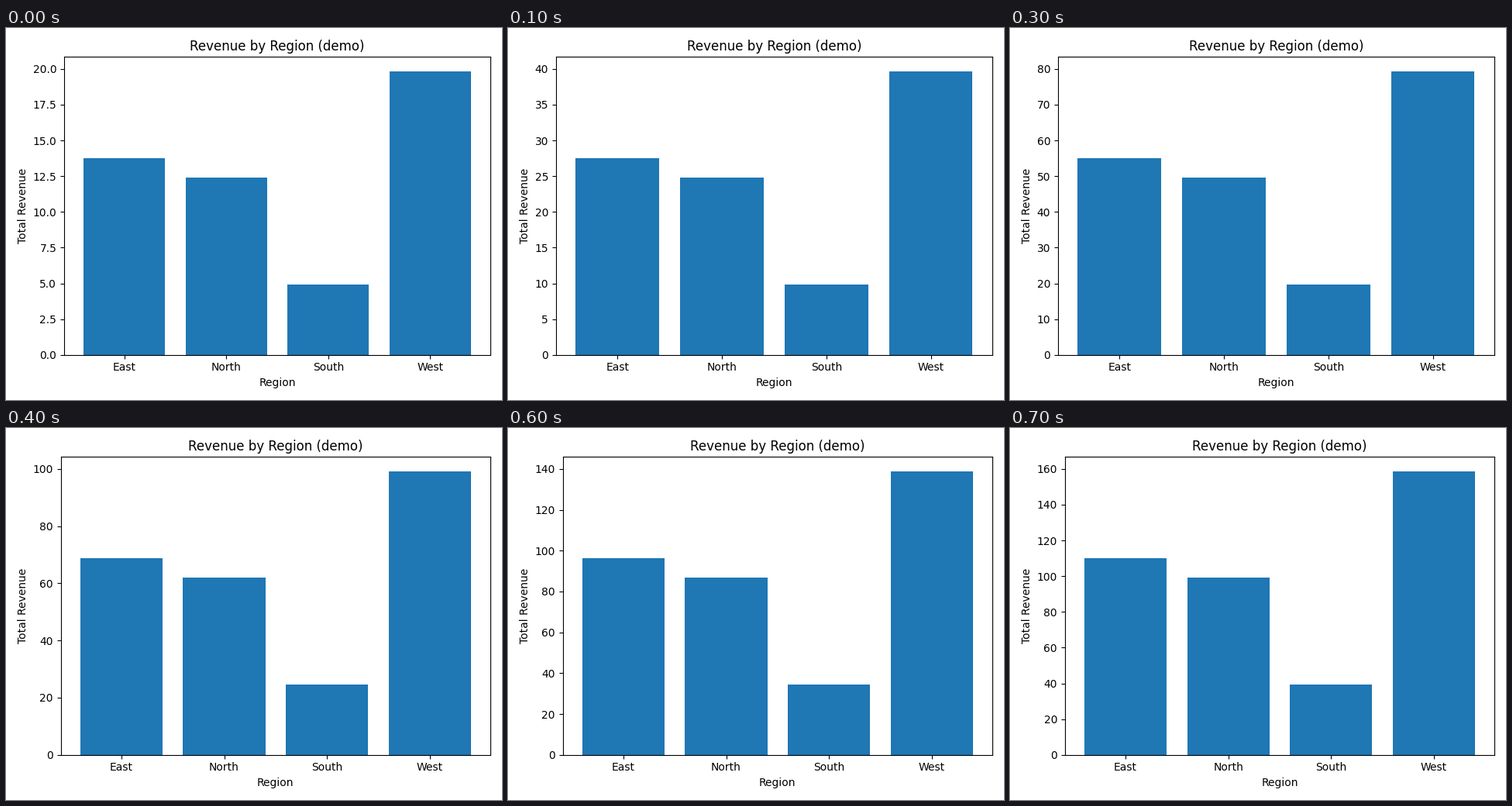
A matplotlib script that plays this animation: 640 by 480 pixels, repeating every 0.8 s.

```python
import matplotlib.pyplot as plt
from matplotlib.animation import FuncAnimation

FRAMES = 8
INTERVAL = 100
FINAL_REVENUE = {"East": 110.0, "North": 99.0, "South": 39.2, "West": 158.8}

fig, ax = plt.subplots(figsize=(6.4, 4.8), dpi=100)


def update(step):
    """Draw the running totals after the given step; the axes rescale to fit."""
    share = (step + 1) / FRAMES
    ax.clear()
    ax.bar(list(FINAL_REVENUE), [share * total for total in FINAL_REVENUE.values()],
           color="#1f77b4")
    ax.set_title("Revenue by Region (demo)")
    ax.set_xlabel("Region")
    ax.set_ylabel("Total Revenue")
    # Start each layout from the same margins so every loop is identical.
    fig.subplots_adjust(left=0.125, right=0.9, bottom=0.11, top=0.88)
    fig.tight_layout()
    return ax.patches


anim = FuncAnimation(fig, update, frames=FRAMES, interval=INTERVAL,
                     init_func=lambda: [], repeat=True, repeat_delay=0)
plt.show()
```
